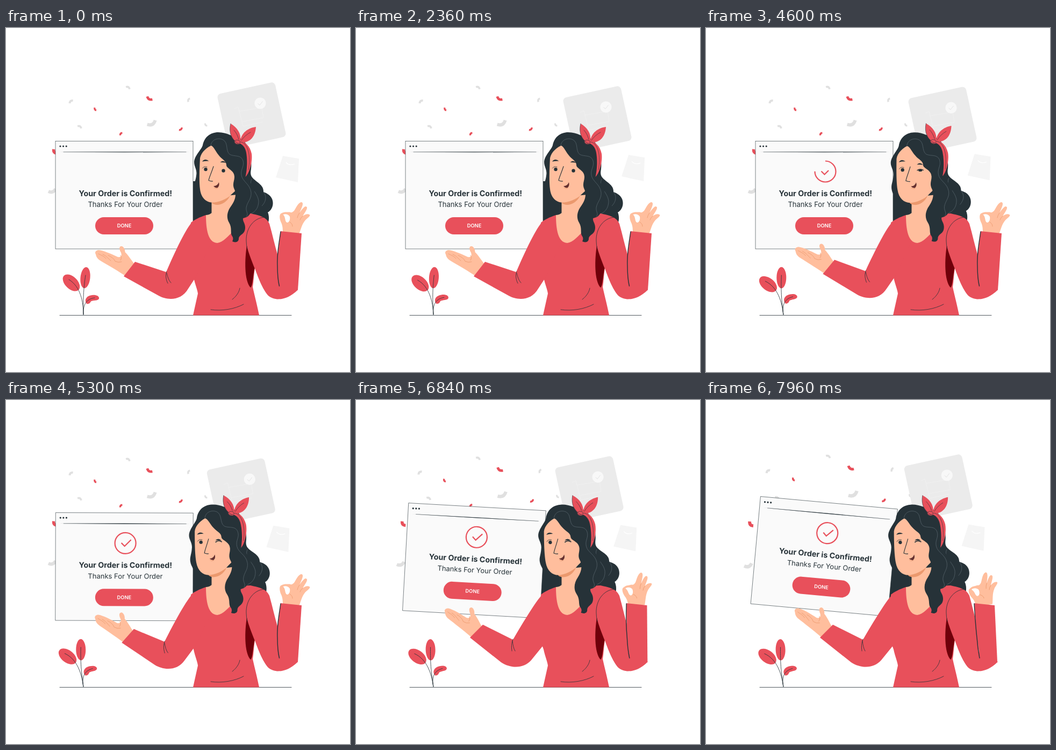
Recreate the animation shown at these times as an HTML page. Size 640 px wide and 640 px high, loop 8000 ms.

```html
<!DOCTYPE html>
<html lang="en">
<head>
<meta charset="utf-8">
<title>Order confirmed</title>
<style>
html, body { margin: 0; height: 100%; overflow: hidden; background: #fff; }
svg { display: block; width: 100vw; height: 100vh; }
text { font-family: Inter, "Open Sans", sans-serif; text-anchor: middle; fill: #263238; }
.red { fill: #e8505b; }
.dark { fill: #263238; }
.skin { fill: #ffbe9d; }
.line { fill: none; stroke: #263238; stroke-width: .8; stroke-linecap: round; }
.strand { fill: none; stroke: #64727a; stroke-width: .6; }
.crease { fill: none; stroke: #eb996e; stroke-width: .8; stroke-linecap: round; }
.tick { fill: none; stroke: #e8505b; stroke-width: 2.2; }
.cart { fill: none; stroke: #f1f1f1; stroke-width: 1; }
</style>
</head>
<body>
<svg viewBox="0 0 640 640">
  <g id="confetti" fill="none"></g>

  <g id="card">
    <rect x="402" y="110.5" width="110" height="104" rx="7" fill="#ebebeb" transform="rotate(-12.3 457 162.5)"/>
    <path class="cart" d="M425 150L432 147L441 183L477 175M434 155L476 148L479 167L440 174"/>
    <circle cx="473" cy="140" r="10.6" fill="#f8f8f8"/>
    <path d="M468.500 140.500L472 143.500L477.500 136.500" fill="none" stroke="#e4e4e4"/>
  </g>
  <g id="bag">
    <path d="M515 238L545 243L543 287L502 278Z" fill="#f5f5f5"/>
    <path d="M521 250Q527 257 537 253" fill="none" stroke="#fff" stroke-width="1.2"/>
  </g>

  <path class="line" d="M100 534.500H531" stroke-width=".7"/>

  <path class="dark" d="M334 285H400V360L334 382Z"/>
  <g id="window">
    <rect x="92" y="210.500" width="256" height="200.500" fill="#fafafa" stroke="#263238" stroke-width=".6"/>
    <path class="dark" d="M98 230.700L220 230.200L342 230.700L220 231.300Z"/>
    <path class="line" d="M107 230.700H335" style="stroke-width:.5"/>
    <g class="dark"><circle cx="101" cy="220" r="1.6"/><circle cx="106.600" cy="220" r="1.6"/><circle cx="112.200" cy="220" r="1.6"/></g>
    <path class="tick" pathLength="1" d="M222 247.500A19.500 19.500 0 0 1 222 286.500A19.500 19.500 0 0 1 222 247.500"/>
    <path class="tick" pathLength="1" d="M214.500 266.500L220.500 272.500L232.500 260.500"/>
    <text x="222.300" y="312.800" font-size="14.3" font-weight="700">Your Order is Confirmed!</text>
    <text x="222" y="333" font-size="13">Thanks For Your Order</text>
    <rect class="red" x="166" y="352" width="108" height="32" rx="16"/>
    <text x="220" y="371" font-size="9.300" font-weight="600" style="fill:#fff">DONE</text>
  </g>

  <g id="plant">
    <ellipse class="red" cx="121.500" cy="474" rx="19" ry="11.500" transform="rotate(44 121.500 474)"/>
    <ellipse class="red" cx="147.500" cy="464.500" rx="9" ry="19.700" transform="rotate(6 147.500 464.500)"/>
    <path class="red" d="M150 513C145 507 149 498 160 497C168 496 174 499 173 503.500C171 508 163 506 158 508.500C156 513 153 514 150 513Z"/>
    <path class="line" d="M144 533C144 510 139 481 117 468M144 533C143 500 145 480 148 460M144 533C143 515 149 504 165 502"/>
  </g>

  <g class="head">
    <path class="dark" d="M395 194C380 194 369 203 366 218C364 226 350 238 350 250C350 258 356 264 354 274C353 284 349 290 350 298C351 308 357 312 358 325C360 340 370 350 385 352L440 362H488C490 355 489 347 487 343C495 339 499 328 495 318C491 309 483 307 479 305C480 292 466 287 459 279C454 274 455 268 456 262C458 240 452 215 437 206C422 203 412 194 395 194Z"/>
    <path class="strand" d="M457 281C450 296 468 305 470 322C470 336 462 345 450 347M479 305C486 314 483 324 476 331"/>
  </g>

  <path class="red" d="M372 348C360 352 350 357 344 362L340 440L349 464C352 478 356 486 357 494L348 534.500H471C467 515 463 500 459 482C461 470 461 458 463 447C470 468 480 490 488 498C500 508 522 508 543 487L507 470L506 424C500 405 496 385 490 364C484 351 472 349 455 345Z"/>
  <path d="M448 405C444 430 443 470 455 483C459 480 459 465 462.500 447C456 430 450 415 448 405Z" fill="#70000a"/>
  <path class="line" d="M481 352C460 353 446 374 447 396Q447 404 449 412M381 524C402 527 425 523 442 514M421 505C430 498 434 490 435 484"/>

  <g id="leftHand">
    <path class="skin" d="M238 438C232 430 227 422 221.500 417C222 412 218 405 214 406C209.500 407 211 413 214 418C216 424 214 427 208 426C195 420 182 414 172 413C166 414 165 418 167 421C168 426 170 429 175 432.500C186 439 205 450 222 461Z"/>
    <path class="crease" d="M172 420C177 423 182 424 186 429M180 421C187 424 190 429 195 433M190 423Q200 427 203 434Q209 437 215 435M213 423Q216 428 213 432"/>
  </g>
  <path id="leftArm" class="red"/>
  <path id="leftFold" class="line"/>

  <g id="rightHand">
    <path class="skin" d="M515 381C515 370 514 366 511 360C508 352 509 345 513 344.500C518 341 524 343 528 342.500C531 344 533 343 536 340C540 334 543 326 549 324C553.500 324 552.500 329 549.500 336L546 344C550 338 554 333 557 332C561.500 332 560.500 336 557.500 341L552 350C556 347 561 345 565 347.500C567 350 560 354 556.500 358C550 366 549 374 545 384Z"/>
    <path d="M515.500 347C520 345 526 347 528 351C529 356 527 362 523 362C518 360 521 352 515.500 347Z" fill="#fff"/>
    <path class="crease" d="M546 344Q543 348 542 353M552 350Q548 353 547 357M528 361Q533 364 533 369"/>
  </g>
  <path id="rightArm" class="red"/>
  <path id="rightSeam" class="line" style="stroke-width:1.4"/>

  <path class="skin" d="M382.500 315V344Q378 348 372 348C372 375 376 399 393 400C404 399 414 386 424 377L430 310Z"/>
  <g class="head">
    <path d="M383 318V325.500C390 332 408 330 417 312Z" fill="#eb996e"/>
    <path class="skin" d="M386 217C374 221 363 231 361 242C360 262 359 285 361 300C363 317 374 326 387 324.500C401 323 414 316 420 309L430 300V262L405 238Z"/>
    <path class="dark" d="M365 248.500Q370 241.500 377.500 247.500Q371 247 365 248.500Z"/>
    <circle class="dark" cx="371.500" cy="263" r="3.200"/>
    <path class="line" d="M365.500 261Q368 256.500 374 258.500"/>
    <g id="wink">
      <circle id="eye" class="dark" r="3.200"/>
      <path id="lid" class="line" style="stroke-width:1.7"/>
      <path id="brow" class="dark" d="M398.500 250Q404 244.500 410 251Q404 249.500 398.500 250Z"/>
    </g>
    <path class="line" d="M386 257.500C382 270 378 278 377 283.500Q381 285.500 384.500 285" style="stroke-width:1.1"/>
    <path d="M386 294Q393 294.500 396 287Q398 294 393 297.500Q389 297.500 386 294Z" fill="#64302f"/>
    <path class="crease" d="M387 297.500Q391 300 394 298"/>
    <path class="dark" d="M372 216L382 219C387 221 390 230 396 237C402 245 410 247 410 255C410 262 425 264 425 277C425 285 421 289 424 298C430 310 426 321 419 331C412 340 409 352 415 362C421 372 417 380 420 386C424 391 422 395 421 397C427 400 433 398 433 392C434 383 445 385 445 371C445 363 440 360 441 354Q453 352 456 341L463 300L446 275L450 230L437 206L395 196Z"/>
    <path class="strand" d="M381 219C382 208 394 203 404 208C414 214 408 228 416 235C425 240 437 235 441 247C444 258 436 262 438 274C440 286 454 290 456 306C457 318 449 323 447 334C446 342 452 346 447 351"/>
    <path class="red" d="M428 213C442 215 447 224 448 240C449 254 448 266 445.500 277C453 270 459 248 457 234C454 219 445 211 432 209Z"/>
    <path class="red" d="M432 215C419 207 414 194 418 178C430 185 438 196 436 210C438 195 450 186 465 184C464 201 455 214 437 213C434 218 426 217 425 212C424 208 429 207 432 208Z"/>
    <path class="line" style="stroke-width:.6" d="M418 178C414 194 419 207 432 215M433 209Q426 207 425 212Q428 218 436 213Q435 209 433 209M433 207Q430 196 424 190M438 209Q445 199 455 194M437 212C450 214 456 237 451 264"/>
  </g>
</svg>
<script>
const LOOP = 8000;
const $ = id => document.getElementById(id);
const clamp = x => Math.min(1, Math.max(0, x));
const ramp = (t, a, b) => clamp((t - a) / (b - a));
const ease = (t, a, b) => { const x = ramp(t, a, b); return x * x * (3 - 2 * x); };
const move = (el, value) => el.setAttribute('transform', value);

// Linear track through [time, value] pairs
function track(t, keys) {
  let i = 1;
  while (i < keys.length - 1 && t > keys[i][0]) i++;
  const [a, u] = keys[i - 1], [b, v] = keys[i];
  return u + (v - u) * ramp(t, a, b);
}

// Blend two paths of equal structure
function blend(el, [from, to], p) {
  const ends = to.match(/[\d.]+/g);
  let i = 0;
  el.setAttribute('d', from.replace(/[\d.]+/g, n => +n + (ends[i++] - n) * p));
}

const shapes = {
  leftArm: [
    'M348 359C335 372 315 415 298 454L240 435L219 462L284 498C300 507 326 508 339 485L354 462L390 380Z',
    'M350 359C338 368 312 412 292 446L236 418L212 442L270 488C288 500 312 500 326 484L352 452L390 380Z'],
  leftFold: [
    'M299 453C296 461 298 469 301 475M299 456C301 464 303 470 307 474',
    'M292 445C289 453 289 460 290 467M291 448C292 456 293 462 296 467'],
  rightArm: [
    'M511 378L550 382L543 487C530 500 510 500 506 481L505 425Z',
    'M499 378L537 382L542 487C530 500 512 500 509 481L503 425Z'],
  rightSeam: [
    'M511 379C507 405 504 425 505 442C505 457 506 470 508.5 480',
    'M499 379C500 395 502 425 504 442C505 457 507 470 509 480']
};

// x, y, length, angle, width, red
const bits = [
  [121, 137, 8, 140, 4, 0], [166, 151, 6, 60, 3.2, 1], [137, 184, 8, 210, 3.6, 0],
  [227, 111, 8, 210, 3.6, 0], [267, 131, 11, 30, 4.6, 1], [271, 177, 17, -28, 6, 0],
  [214, 197, 6, 130, 3.4, 1], [325, 188, 7, -40, 3.4, 1], [340, 134, 7, 115, 3.4, 0],
  [372, 180, 6, 50, 3, 0], [91, 230, 10, 50, 5.5, 1], [86, 303, 14, -20, 6, 0]
];
$('confetti').innerHTML = bits.map(([x, y, s, a, w, red]) =>
  `<path d="M${-s / 2} ${-s * .1}Q0 ${s * .4} ${s / 2} ${-s * .1}" stroke="${red ? '#e8505b' : '#e0e0e0'}"
    stroke-width="${w}" transform="translate(${x} ${y}) rotate(${a})"/>`).join('');

const heads = document.querySelectorAll('.head');
const ticks = document.querySelectorAll('.tick');

function draw(t) {
  const burst = 1 + .055 * ramp(t, 6150, 7960);
  move($('confetti'), `translate(222 215) scale(${burst}) translate(-222 -215)`);

  const cx = track(t, [[0, 0], [2360, -8], [4600, -17], [5300, -19.7], [6280, -22], [7960, -24.7]]);
  const cy = track(t, [[0, 0], [1200, 4.4], [2360, 7], [3600, 8.6], [4600, 8.4], [5300, 7.4], [6280, 5], [7960, 0]]);
  move($('card'), `translate(${cx} ${cy})`);
  move($('bag'), `translate(${-26.5 * t / 7960} ${-6.4 * t / 7960})`);
  move($('plant'), `rotate(${-7.3 * ease(t, 200, 6300)} 144 534)`);

  const lift = track(t, [[5050, 0], [5300, .03], [6280, .4], [6840, .61], [7960, 1]]);
  move($('window'), `translate(${9.5 * lift} ${-31 * lift}) rotate(${5.25 * lift} 92 210)`);
  const drawn = ramp(t, 3480, 4970);
  ticks.forEach(el => {
    el.setAttribute('stroke-dasharray', `${drawn} 2`);
    el.style.visibility = drawn ? 'visible' : 'hidden';
  });

  const tilt = -3.3 * ease(t, 2900, 6000);
  heads.forEach(el => move(el, `rotate(${tilt} 400 440)`));
  const shut = ease(t, 4250, 5100);
  move($('eye'), `translate(404.500 ${265.500 - shut}) scale(${1 + .3 * shut} ${1 - shut})`);
  $('lid').setAttribute('d', `M399 ${265 - shut}Q404 ${262 - 2 * shut} 410 ${265 - shut}`);
  $('lid').style.opacity = ramp(shut, .15, .4);
  move($('brow'), `translate(0 ${11 * shut})`);

  const raise = ease(t, 3600, 6900);
  blend($('leftArm'), shapes.leftArm, raise);
  blend($('leftFold'), shapes.leftFold, raise);
  move($('leftHand'), `translate(${-5.5 * raise} ${-18.500 * raise}) rotate(${7.5 * raise} 229 448)`);

  const wave = track(t, [[5300, 0], [5750, .07], [6280, .3], [6840, .66], [7400, .88], [7960, 1]]);
  blend($('rightArm'), shapes.rightArm, wave);
  blend($('rightSeam'), shapes.rightSeam, wave);
  move($('rightHand'), `translate(${-12.500 * wave} 0) rotate(${-17 * wave} 530 380)`);
}

const start = performance.now();
function frame(now) {
  draw(Math.max(0, now - start) % LOOP);
  requestAnimationFrame(frame);
}
draw(0);
requestAnimationFrame(frame);
</script>
</body>
</html>
```
